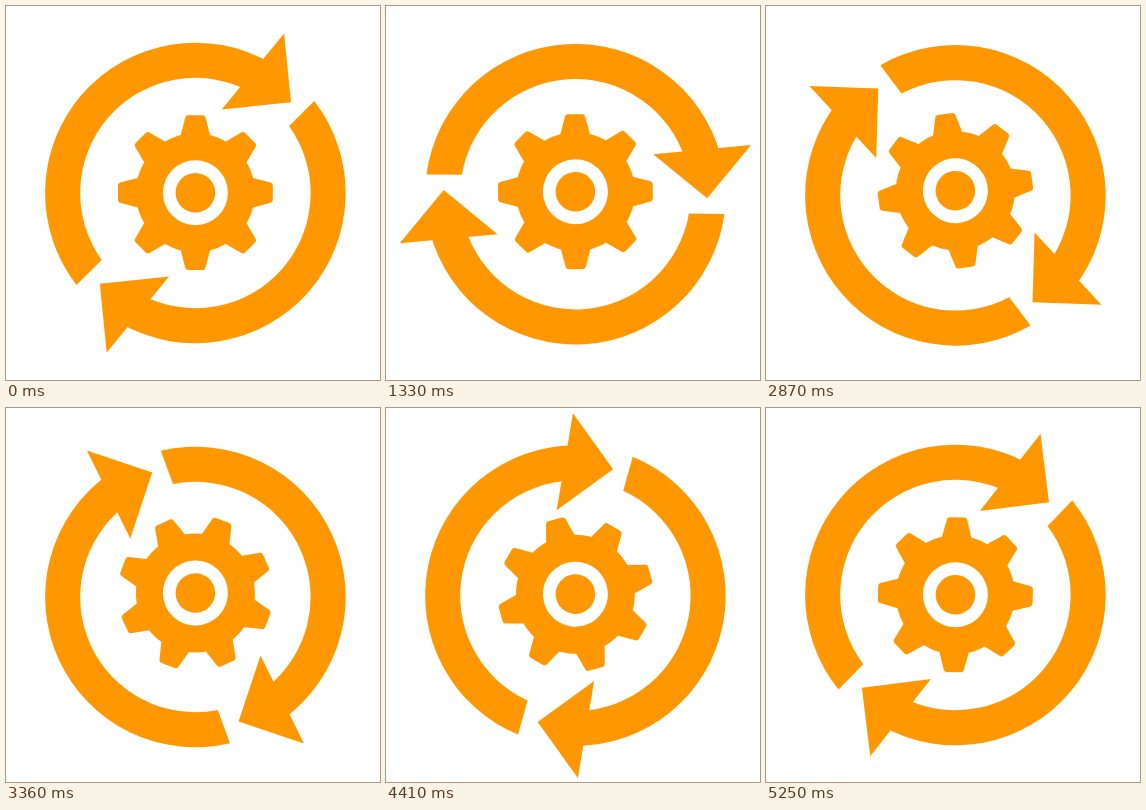
These frames come from a looping animation (374x374 px, 5.32 s). An HTML page:

```html
<!DOCTYPE html>
<html lang="en">
<head>
<meta charset="utf-8">
<title>Process</title>
<style>
  html, body { margin: 0; width: 100%; height: 100%; overflow: hidden; background: #fff; }
  svg { display: block; width: 100%; height: 100%; }
</style>
</head>
<body>
<svg viewBox="0 0 374 374" fill="#ff9800">
  <g id="arrows"></g>
  <g id="gear">
    <circle r="59.5"/>
    <g id="teeth" stroke="#ff9800" stroke-width="6" stroke-linejoin="round"></g>
    <circle r="32.5" fill="#fff"/>
    <circle r="19.8"/>
  </g>
</svg>
<script>
const STEP = 70, FRAMES = 76, TURN = 2.383, CX = 189.4;
const $ = id => document.getElementById(id);

// Point at radius r and angle a in degrees, clockwise from the right
const at = (r, a) => {
  const rad = a * Math.PI / 180;
  return `${(r * Math.cos(rad)).toFixed(2)} ${(r * Math.sin(rad)).toFixed(2)}`;
};

const OUTER = 150.3, INNER = 115.2;
const band = `M${at(OUTER, 142.3)}A${OUTER} ${OUTER} 0 0 1 ${at(OUTER, -60)}` +
  `L${at(INNER, -62)}A${INNER} ${INNER} 0 0 0 ${at(INNER, 144.4)}Z`;
const head = `M${at(182.4, -60.9)}L${at(131.8, -43.5)}L${at(87.5, -72.5)}Z`;

$('arrows').innerHTML = [0, 180].map(a =>
  `<g transform="rotate(${a})"><path d="${band}"/><path d="${head}"/></g>`).join('');

$('teeth').innerHTML = Array.from({ length: 8 }, (_, i) =>
  `<path transform="rotate(${i * 45})" d="M-12.3-55L-7.2-74.4H7.2L12.3-55Z"/>`).join('');

const place = (id, y, angle) =>
  $(id).setAttribute('transform', `translate(${CX} ${y}) rotate(${angle})`);

const start = performance.now();
function draw() {
  const n = Math.floor((performance.now() - start) / STEP) % FRAMES;
  const sway = Math.cos(2 * Math.PI * n / FRAMES);
  place('arrows', 188.2 - 1.2 * sway, n * TURN);
  place('gear', 185.7 + sway, -n * TURN);
  requestAnimationFrame(draw);
}
draw();
</script>
</body>
</html>
```
